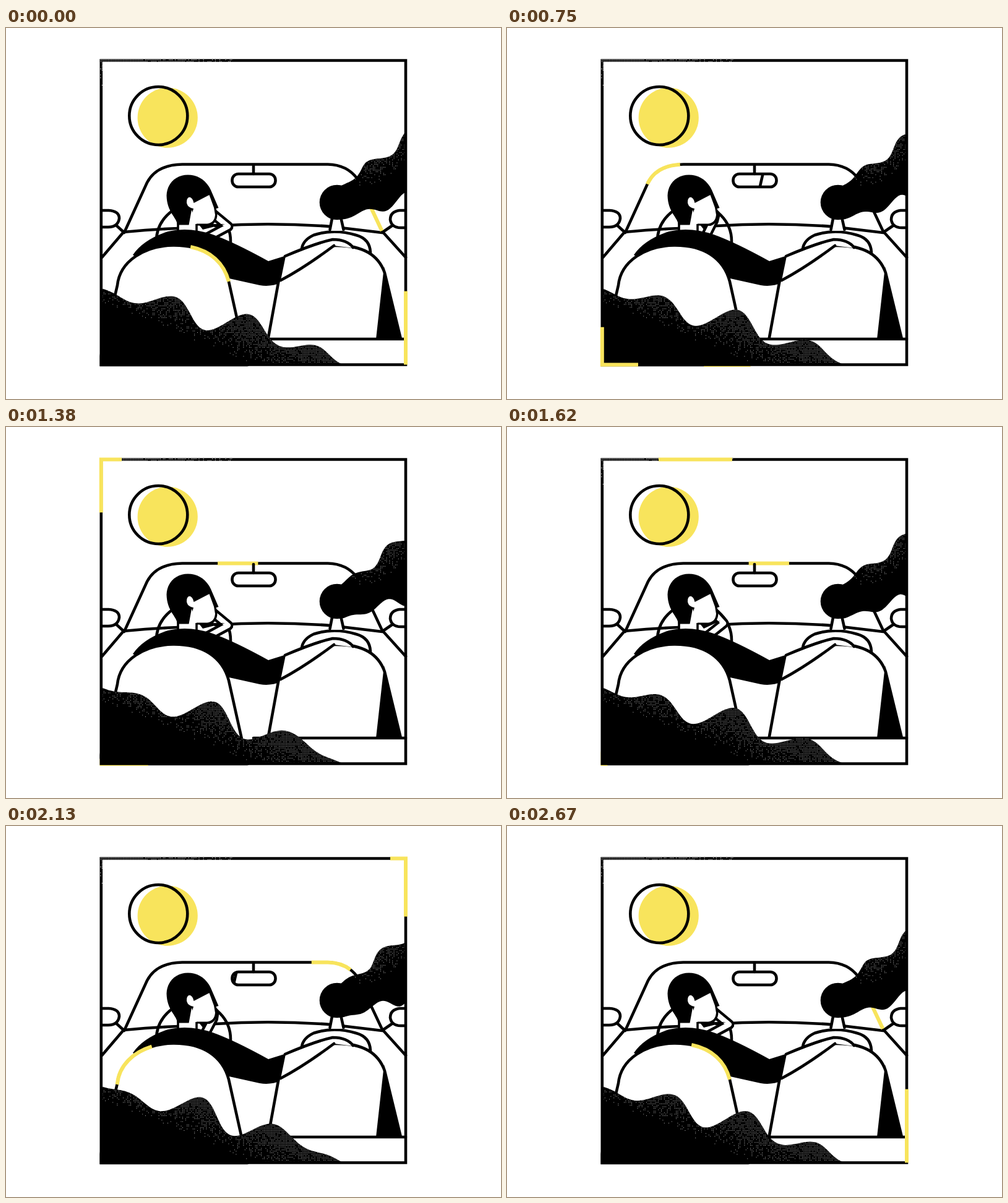
These frames come from a looping animation (800x600 px, 2.7 s). An HTML page:

```html
<!DOCTYPE html>
<html lang="en">
<head>
<meta charset="utf-8">
<title>Road trip</title>
<style>
html, body { margin: 0; width: 100%; height: 100%; overflow: hidden; background: #fff; }
svg { display: block; width: 100vw; height: 100vh; }
.ink { fill: none; stroke: #000; stroke-width: 4.6; stroke-linejoin: round; stroke-linecap: round; }
.paper { fill: #fff; }
.glow { fill: none; stroke: #f8e45c; stroke-width: 6; }
</style>
</head>
<body>
<svg viewBox="0 0 800 600" xmlns="http://www.w3.org/2000/svg">
  <defs>
    <clipPath id="inHill"><path id="hillClip"/></clipPath>
    <clipPath id="inHair"><path id="hairClip"/></clipPath>
    <clipPath id="inGlass"><rect x="366" y="237" width="68" height="20" rx="10"/></clipPath>
  </defs>

  <circle cx="261.2" cy="145.2" r="48.6" fill="#f8e45c"/>

  <circle class="ink" cx="246.3" cy="142" r="47"/>
  <path id="shield" class="ink" d="M191 331L228 250Q243 221 285 220.5H520Q551 221 568 244L607.500 328"/>
  <path class="ink" d="M190 330Q240 325.500 278 324M338 320Q430 314 524 321L608 331M190 330L155 371M609 330L646 371"/>
  <path class="ink" d="M156 295H166Q183 296 183 308Q181 322 165 322H156M178 319L190 330"/>
  <path class="ink" d="M645 295H636Q621 297 621 310Q623 323 638 323H645M625 319L609 330"/>
  <path class="glow" id="shieldGlow" pathLength="1"/>

  <path class="ink" d="M400 222V236"/>
  <rect class="ink" x="365.500" y="236" width="70" height="21" rx="10"/>
  <circle class="ink" cx="303" cy="345" r="60"/>
  <g clip-path="url(#inGlass)"><path id="glint" class="ink"/></g>

  <path id="armInk" class="ink" style="stroke-width:17"/>
  <path id="armSkin" class="ink" style="stroke:#fff;stroke-width:8.2"/>
  <path id="armGap"/>

  <!-- driver -->
  <path class="paper" d="M277 316H308V330H277Z"/>
  <path class="ink" style="stroke-linecap:butt;stroke-width:3.6" d="M278 312V330M308 317V330"/>
  <path d="M294 237.500C311 237.500 324 247 331 262L343.500 291L339.500 292C344 302 341 317 329 320L309 319.500L300 294L295.500 318.500H277C276 306 260 298 259.500 271C260 251 275 237.500 294 237.500Z"/>
  <path class="paper" d="M303.500 283L328.500 270L336 290.500L338 302Q337 315 325 316.500H296.500L303 292Q294 291 292 283Q291.500 274 297 273.500Q302 275 303.500 283Z"/>
  <path d="M205 367Q222 342 262 329Q296 321 334 334Q368 346 424 377L453 368L444 412Q428 419 410 416L356 404L300 420Z"/>

  <!-- passenger and seat -->
  <path class="paper" d="M478 357Q480 343 497 335Q530 324 566 335Q588 341 589 363V380H478Z"/>
  <path class="ink" d="M478 357Q480 343 497 335Q530 324 566 335Q588 341 589 363"/>
  <path class="paper" d="M443 407L530 352Q596 350 612 396L638 503H425Z"/>
  <path class="ink" d="M441 407L423.500 503M530 352Q596 350 612 396L638 503M400 503H646"/>
  <path d="M611 386L598 503H639Z"/>
  <path class="paper" d="M452 369Q500 350 528 342Q552 342 562 356L530 352L444 408Z"/>
  <path class="ink" d="M451 369Q500 348 528 342Q551 342 561 355M444 408Q482 388 530 352"/>
  <path class="paper" d="M527 308L523 328H546L542 308Z"/>
  <path class="ink" d="M527 308L523.500 326M541.500 308L545.500 326"/>
  <path id="hair"/>
  <path id="hairDots" fill="#b4b4b4" clip-path="url(#inHair)"/>
  <circle cx="535" cy="282" r="28.300"/>

  <path id="seat" class="ink" style="fill:#fff" d="M360 410L390 545H150L180 416C184 377 224 352 270 351.500C318 351 350 372 360 410Z"/>
  <path class="glow" id="seatGlow" pathLength="1"/>
  <rect x="140" y="40" width="11.500" height="520" fill="#fff"/>

  <path id="hill"/>
  <path id="hillDots" fill="#b4b4b4" clip-path="url(#inHill)"/>

  <path id="frame" class="ink" style="stroke-linejoin:miter" d="M646 544.500H153.800V52.500H646Z"/>
  <path id="frameDots" fill="#fff"/>
  <path class="glow" id="frameGlow" pathLength="1"/>
</svg>
<script>
const $ = id => document.getElementById(id);
const TAU = Math.PI * 2;
const clamp = v => Math.max(0, Math.min(1, v));
const set = (id, d) => $(id).setAttribute('d', d);
const poly = pts => 'M' + pts.map(p => p[0].toFixed(1) + ' ' + p[1].toFixed(1)).join('L') + 'Z';

let seed = 11;
const rand = () => (seed = seed * 16807 % 2147483647) / 2147483647;

// Smooth lookup through evenly spaced values, u from 0 to 1
function curve(v, u) {
  const x = clamp(u) * (v.length - 1), i = Math.min(v.length - 2, Math.floor(x)), f = x - i;
  const b = v[i], c = v[i + 1], a = v[i - 1] ?? b, d = v[i + 2] ?? c;
  return b + f / 2 * (c - a + f * (2 * a - 5 * b + 4 * c - d + f * (3 * (b - c) + d - a)));
}

// Scattered specks whose density follows a rule
function specks(x0, y0, x1, y1, step, size, density) {
  let d = '';
  for (let y = y0; y < y1; y += step)
    for (let x = x0; x < x1; x += step)
      if (rand() < density(x, y))
        d += `M${x.toFixed(1)} ${y.toFixed(1)}h${size}v${size}h-${size}z`;
  return d;
}

const HILL_LEN = 409;
const swell = [0, 7, 15, 22, 23.5, 20, 13, 8, 0];
const lift = [0, 0, 4.5, 9, 9.5, 11, 10.5, 11, 0];

function hillPath(ph) {
  const pts = [[152, 545], [152, 421]];
  for (let s = 0; s <= HILL_LEN; s += 3) {
    const u = s / HILL_LEN;
    const d = curve(lift, u) + curve(swell, u) * Math.cos(TAU * ((s - 113) / 131.5 - ph));
    pts.push([153 + 0.954 * s + 0.3 * d, 421 + 0.3 * s - 0.954 * d]);
  }
  pts.push([544, 545]);
  return poly(pts);
}

function hairPath(ph) {
  const pts = [];
  for (let s = 0; s <= 160; s += 3) {
    const d = -2.5 * clamp(s / 40) + 8 * clamp(s / 55) * Math.cos(TAU * ((s - 57) / 82 - ph));
    const x = 540 + 0.795 * s - 0.606 * d;
    if (x < 645) pts.push([x, 256 - 0.606 * s - 0.795 * d]);
  }
  const last = pts[pts.length - 1];
  pts.push([645, last[1] - (645 - last[0]) * 0.5]);
  for (let x = 645; x >= 540; x -= 3) {
    const k = Math.max(0, x - 545);
    pts.push([x, 309.5 - k * 0.315 + k * 0.12 * Math.cos(TAU * ((x - 612) / 67 - ph))]);
  }
  return poly(pts);
}

// A dash whose front runs once along the path
function dash(id, len, p) {
  const st = $(id).style;
  st.strokeDasharray = `${len} ${1 - len}`;
  st.strokeDashoffset = len - p;
}

function draw(ms) {
  const n = Math.floor(ms / 30) % 90, t = n * 30, p = n / 89, ph = t / 900;

  dash('frameGlow', 0.0604, p);
  dash('shieldGlow', 0.121, p);
  dash('seatGlow', 0.118, p);

  const hill = hillPath(ph), hair = hairPath(ph);
  set('hill', hill);
  set('hillClip', hill);
  set('hair', hair);
  set('hairClip', hair);

  const c = Math.cos(TAU * t / 1350);
  const ex = 346 + 13 * c, ey = 316 + 5 * c;
  const arm = `M336 302L${ex} ${ey}L318 343`;
  set('armInk', arm);
  set('armSkin', arm);
  set('armGap', `M311 317L${ex - 5} ${ey - 4}L318 326Z`);

  const gx = 411 - (t % 1350 - 750) * 1.37;
  set('glint', `M${gx + 2.5} 236L${gx - 2.5} 258`);
}

for (const id of ['frame', 'shield', 'seat']) set(id + 'Glow', $(id).getAttribute('d'));

set('hillDots', specks(153, 420, 544, 543, 2.4, 1, (x, y) => {
  const s = 0.954 * (x - 153) + 0.3 * (y - 421);
  const d = 0.3 * (x - 153) - 0.954 * (y - 421);
  return 0.85 * clamp((d + 22 + 0.08 * s) / 55);
}));
set('hairDots', specks(545, 160, 645, 260, 2.4, 1, (x, y) => {
  const s = 0.795 * (x - 540) - 0.606 * (y - 256);
  const d = -0.606 * (x - 540) - 0.795 * (y - 256);
  return 0.85 * clamp((d + 34) / 40) * clamp((s - 15) / 60);
}));
set('frameDots',
  specks(153, 51, 400, 54.5, 2.4, 1.1, x => 0.95 * clamp((400 - x) / 160)) +
  specks(152.4, 56, 156, 110, 2.4, 1.1, (x, y) => 0.7 * clamp((95 - y) / 45)));

const start = performance.now();
function tick() {
  draw((performance.now() - start) % 2700);
  requestAnimationFrame(tick);
}
draw(0);
requestAnimationFrame(tick);
</script>
</body>
</html>
```
